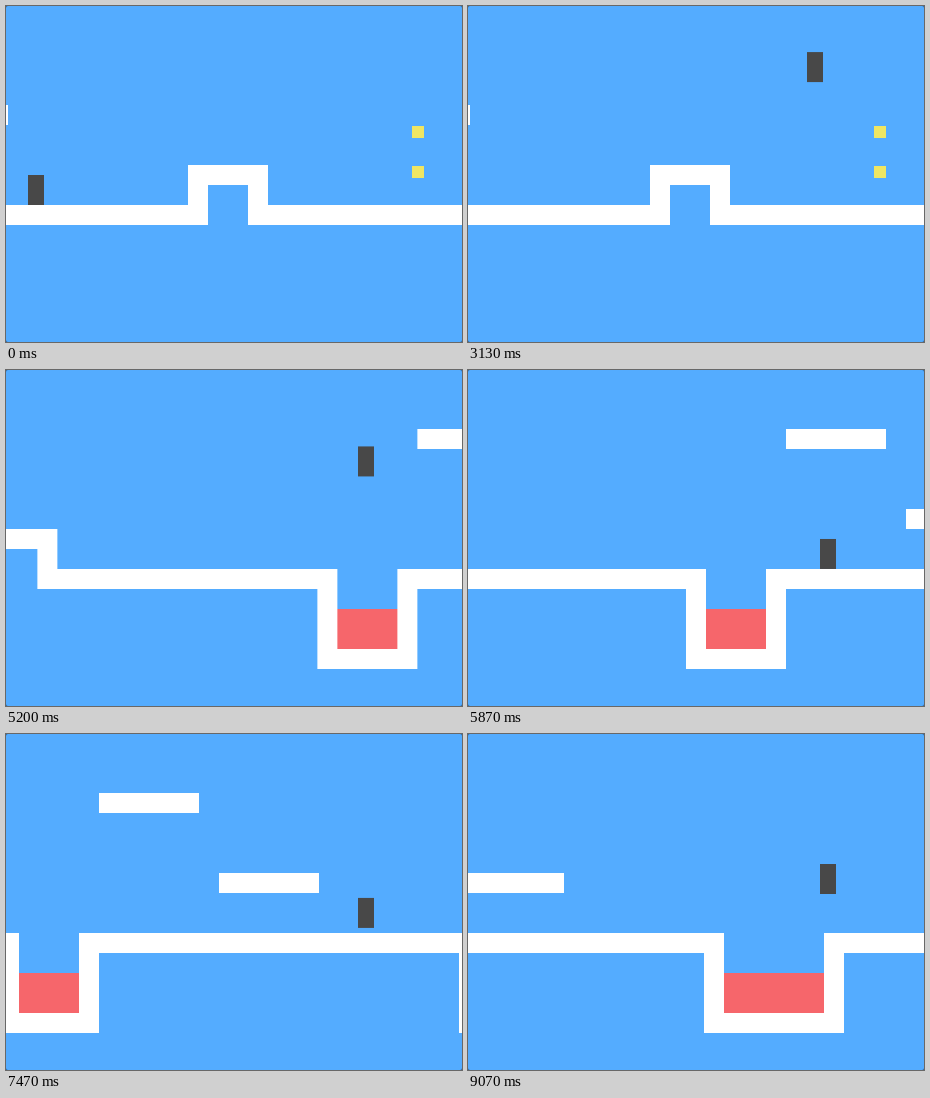
Write an HTML page without scripts that moves like this. It is 456x336 px and loops after 9140 ms.

```html
<!DOCTYPE html>
<html lang="en">
<head>
<meta charset="utf-8">
<title>Platform run</title>
<style>
  html, body { margin: 0; width: 100%; height: 100%; overflow: hidden; background: #2c5c8a; }
  svg { display: block; width: 456px; height: 336px; shape-rendering: crispEdges; }

  :root {
    --loop: 9140ms;
    --rise: cubic-bezier(.333, .667, .667, 1);
    --fall: cubic-bezier(.333, 0, .667, .333);
  }

  .sky { fill: #54acff; shape-rendering: auto; }
  .walls { fill: none; stroke: #fff; stroke-width: 20; }
  .lava { fill: #f6666b; }
  .coin { fill: #f0e662; }
  .player { fill: #484848; }

  .world, .run, .player, .taken { animation: var(--loop) linear -10ms infinite; }
  .world { animation-name: scroll; }
  .run { animation-name: run; }
  .player { animation-name: jump; }
  .upper { animation-name: take-upper; }
  .lower { animation-name: take-lower; }

  /* twelve bobs per loop */
  .coin { animation: bob calc(var(--loop) / 12) step-end infinite; }
  .upper .coin { animation-delay: -459ms; }
  .lower .coin { animation-delay: -607ms; }

  @keyframes bob {
    0% { transform: translateY(0); }
    5.8% { transform: translateY(1px); }
    44.2% { transform: translateY(0); }
    55.8% { transform: translateY(-1px); }
    94.2%, 100% { transform: translateY(0); }
  }

  @keyframes take-upper { 0%, 38.68% { opacity: 1; } 38.686%, 100% { opacity: 0; } }
  @keyframes take-lower { 0%, 40.14% { opacity: 1; } 40.146%, 100% { opacity: 0; } }

  @keyframes run {
    0% { transform: translateX(22px); }
    9.489% { transform: translateX(22px); animation-timing-function: steps(19); }
    23.358% { transform: translateX(202px); animation-timing-function: steps(15); }
    34.307% { transform: translateX(339px); animation-timing-function: steps(2); }
    35.766%, 100% { transform: translateX(352px); }
  }

  @keyframes scroll {
    0% { transform: translateX(0); }
    35.036% { transform: translateX(0); animation-timing-function: steps(12); }
    43.796% { transform: translateX(-109px); }
    48.905% { transform: translateX(-109px); animation-timing-function: steps(6); }
    53.285% { transform: translateX(-164px); animation-timing-function: steps(15); }
    64.234% { transform: translateX(-304px); animation-timing-function: steps(24); }
    81.752% { transform: translateX(-529px); animation-timing-function: steps(17); }
    94.161% { transform: translateX(-688px); animation-timing-function: steps(7); }
    99.27%, 100% { transform: translateX(-746px); }
  }

  /* every jump rises 95px; falls end on whatever lies below */
  @keyframes jump {
    0% { transform: translateY(169px); }
    15.04% { transform: translateY(169px); animation-timing-function: var(--rise); }
    21.24% { transform: translateY(74px); animation-timing-function: var(--fall); }
    25.99% { transform: translateY(129px); }
    27.45% { transform: translateY(129px); animation-timing-function: var(--rise); }
    33.65% { transform: translateY(34px); animation-timing-function: var(--fall); }
    41.06% { transform: translateY(169px); }
    52.08% { transform: translateY(169px); animation-timing-function: var(--rise); }
    58.28% { transform: translateY(74px); animation-timing-function: var(--fall); }
    64.49% { transform: translateY(169px); }
    66.13% { transform: translateY(169px); animation-timing-function: var(--rise); }
    72.34% { transform: translateY(74px); animation-timing-function: var(--fall); }
    76.1% { transform: translateY(109px); }
    78.65% { transform: translateY(109px); animation-timing-function: var(--fall); }
    83.58% { transform: translateY(169px); }
    88.37% { transform: translateY(169px); animation-timing-function: var(--rise); }
    94.58% { transform: translateY(74px); animation-timing-function: var(--fall); }
    99.34%, 100% { transform: translateY(130px); }
  }
</style>
</head>
<body>
<svg width="456" height="336" viewBox="0 0 456 336">
  <rect class="sky" width="456" height="336" rx="2"/>
  <g class="world">
    <rect class="lava" x="542" y="239" width="60" height="40"/>
    <rect class="lava" x="1002" y="239" width="100" height="40"/>
    <path class="walls" d="M-20 209H192V169H252V209H532V289H612V209H992V289H1112V209H1300"/>
    <path class="walls" d="M-18 109h20M622 69h100M742 149h100"/>
    <g class="taken upper"><rect class="coin" x="406" y="121" width="12" height="12"/></g>
    <g class="taken lower"><rect class="coin" x="406" y="161" width="12" height="12"/></g>
  </g>
  <g class="run"><rect class="player" width="16" height="30"/></g>
</svg>
</body>
</html>
```
